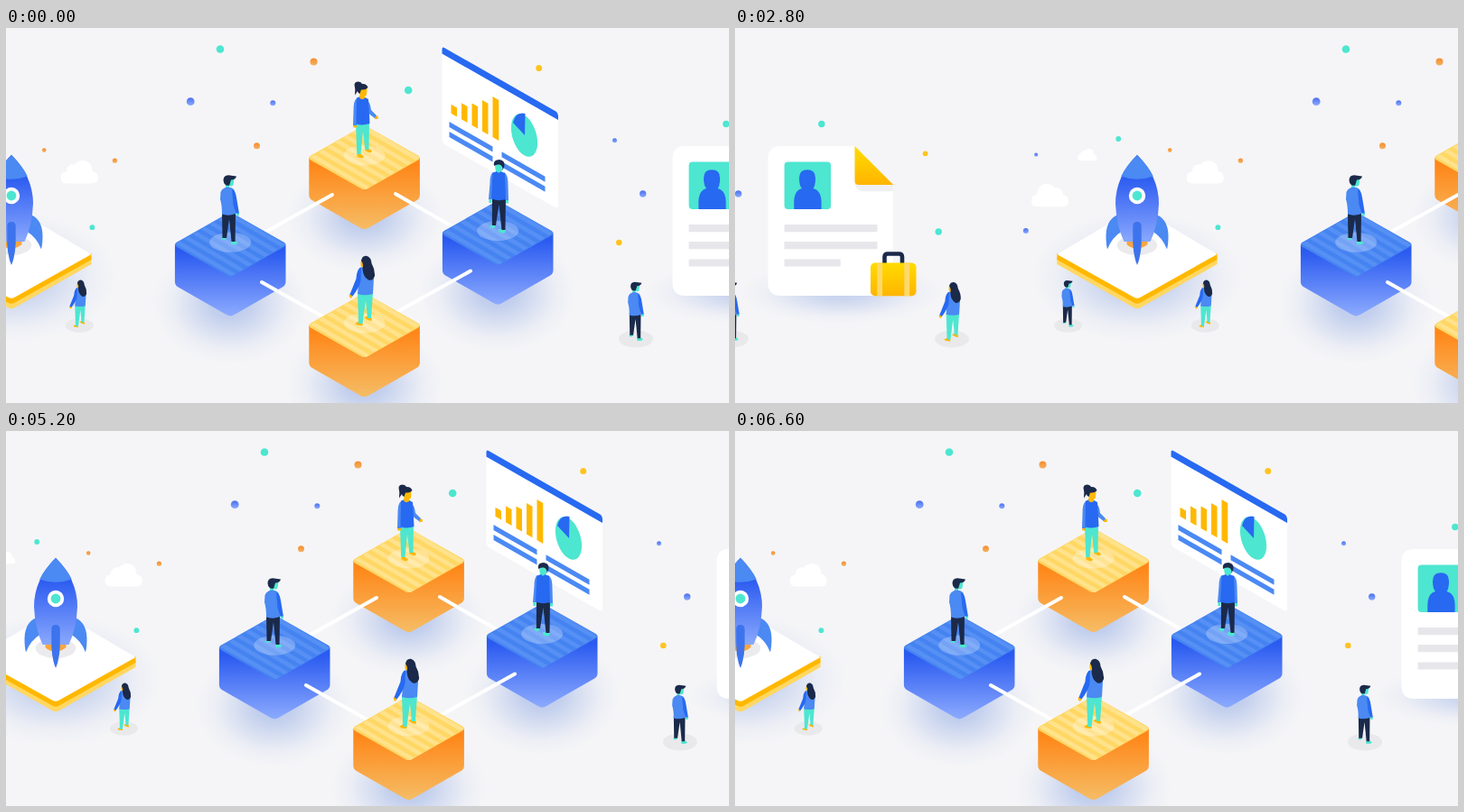
Recreate the animation shown at these times as an HTML page. Size 800 px wide and 416 px high, loop 7600 ms.

```html
<!DOCTYPE html>
<html lang="en">
<head>
<meta charset="utf-8">
<title>Sliding scenes</title>
<style>
html, body { margin: 0; width: 100%; height: 100%; overflow: hidden; background: #f5f5f7; }
#stage { position: relative; width: 100%; height: 100%; overflow: hidden; contain: strict; }
/* animating left keeps every step on whole pixels */
#strip { display: block; position: absolute; left: 0; top: 0; animation: slide 7600ms -4ms infinite; }
/* out and back in 19 equal steps of 100 ms each way */
@keyframes slide {
  0% { left: 0; }
  25% { left: 0; animation-timing-function: steps(19, end); }
  50% { left: -1480px; }
  61.842105% { left: -1480px; animation-timing-function: steps(19, end); }
  86.842105%, 100% { left: 0; }
}
.white { fill: #fff; }
.dark { fill: #1b2a4a; }
.teal { fill: #4de6d0; }
.yellow { fill: #ffb800; }
.blue { fill: #2769f1; }
.sky { fill: #4b89f3; }
.grey { fill: #e9e9ec; }
.link { stroke: #fff; stroke-width: 4; stroke-linecap: round; }
</style>
</head>
<body>
<div id="stage">
<svg id="strip" width="3420" height="416" viewBox="0 0 3420 416">
<defs>
  <linearGradient id="blueSide" gradientUnits="userSpaceOnUse" x1="0" y1="0" x2="0" y2="80">
    <stop offset=".1" stop-color="#2a5af0"/><stop offset="1" stop-color="#8dabfe"/>
  </linearGradient>
  <linearGradient id="orangeSide" gradientUnits="userSpaceOnUse" x1="0" y1="0" x2="0" y2="80">
    <stop offset=".1" stop-color="#ff8719"/><stop offset="1" stop-color="#f5bd66"/>
  </linearGradient>
  <linearGradient id="hull" gradientUnits="userSpaceOnUse" x1="0" y1="164" x2="0" y2="240">
    <stop offset="0" stop-color="#2a5af0"/><stop offset="1" stop-color="#8dabfe"/>
  </linearGradient>
  <linearGradient id="gold" x1="0" y1="0" x2="0" y2="1">
    <stop offset="0" stop-color="#ffdc00"/><stop offset="1" stop-color="#ffb400"/>
  </linearGradient>
  <linearGradient id="blueDot" x1="0" y1="0" x2="0" y2="1">
    <stop offset="0" stop-color="#4a70f0"/><stop offset="1" stop-color="#8dabfe"/>
  </linearGradient>
  <linearGradient id="orangeDot" x1="0" y1="0" x2="0" y2="1">
    <stop offset="0" stop-color="#f98c2c"/><stop offset="1" stop-color="#f2b264"/>
  </linearGradient>
  <radialGradient id="shade">
    <stop offset="0" stop-color="#a9bce8" stop-opacity=".8"/><stop offset=".25" stop-color="#a9bce8" stop-opacity=".66"/>
    <stop offset=".5" stop-color="#a9bce8" stop-opacity=".38"/><stop offset=".75" stop-color="#a9bce8" stop-opacity=".12"/>
    <stop offset="1" stop-color="#a9bce8" stop-opacity="0"/>
  </radialGradient>

  <path id="sides" d="M-61.3,0V41Q-61.3,45-58,47L-4,78Q0,80.3 4,78L58,47Q61.3,45 61.3,41V0Z"/>
  <path id="lid" d="M-59.5,-2.5L-4,-34Q0,-36.4 4,-34L59.5,-2.5Q63,0 59.5,2.5L4,34Q0,36.4-4,34L-59.5,2.5Q-63,0-59.5,-2.5Z"/>
  <clipPath id="lidClip"><use href="#lid"/></clipPath>
  <g id="stripes" clip-path="url(#lidClip)">
    <path transform="matrix(61.3 36 -61.3 36 0 -36)" fill="none" stroke-width=".075"
      d="M0,.04H1M0,.19H1M0,.34H1M0,.49H1M0,.64H1M0,.79H1M0,.94H1"/>
  </g>
  <g id="blueCube">
    <use href="#sides" fill="url(#blueSide)"/><use href="#lid" fill="#4583f1"/>
    <use href="#stripes" stroke="#5690f4"/>
    <ellipse cy="-2.5" rx="23" ry="11" fill="#fff" opacity=".25"/>
  </g>
  <g id="orangeCube">
    <use href="#sides" fill="url(#orangeSide)"/><use href="#lid" fill="#ffd764"/>
    <use href="#stripes" stroke="#ffe28b"/>
    <ellipse cy="-2.5" rx="23" ry="11" fill="#fff" opacity=".3"/>
  </g>

  <!-- figures stand on the origin -->
  <g id="man"><g transform="translate(-247.5 -238)">
    <path class="teal" d="M238.5,234L240,231H244L243.5,234Q241,236 238.5,234ZM249,236H253.5L257,238.5Q255,241 249,240Z"/>
    <path class="dark" d="M239,204H254L253.6,237H249.5L247,212L244,233H239.5Z"/>
    <path class="teal" d="M246,167H252.5L251.5,174Q250,176.5 247,175V179H243V172Z"/>
    <path class="dark" d="M240.5,169Q240.5,163.5 246,163.2L255,164.4Q254,168.3 249,168.5L247.2,174.5Q241.5,176 240.5,169Z"/>
    <path class="sky" d="M237.5,182Q240,176.5 246,176.5Q252,177 253,181L254,206Q246,209 239,206.5Q239,196 237,190Z"/>
    <path class="blue" d="M250,179Q254,180 255,188L258,206H254.5L251.5,196Z"/>
    <path class="teal" d="M254.5,205.5H258L257.5,208.5H255Z"/>
  </g></g>
  <g id="woman"><g transform="translate(-396.5 -327)">
    <path class="yellow" d="M386,328L390,325.5H394.5V330Q389,330.5 386,328ZM396.5,321L400,319.5L405,322L404.5,325Q399,324 396.5,321Z"/>
    <path class="teal" d="M389,293H406L404,322H400L398,302L394.5,328H390.2Z"/>
    <path class="yellow" d="M393,257Q391.5,264 394,266L398,267V256ZM380,295L384,296.5L382,300Q379,299 380,295Z"/>
    <path class="sky" d="M391,266Q398,264 404,268L407,278L406,295Q397,297.5 389,295L390,283Z"/>
    <path class="blue" d="M393,265.5Q388,267 387.5,278L380.5,295.5L383.5,297.5Q391,288 392.5,280Z"/>
    <path class="dark" d="M393,258Q394,252.6 399,252.8Q404,254 404.5,261Q408.5,268 408,275Q406,281 401,279.5Q395,276 394.5,267Q396,262 393,258Z"/>
  </g></g>
  <g id="ponytailWoman">
    <path class="yellow" d="M388,141L391,138.5L396,142.5L394.5,144.5Q389,144 388,141ZM397,135L400,133L405,136L404,138.3Q399,138 397,135Z"/>
    <path class="teal" d="M387,105H402L401.5,135H397.3L395,114L392.5,140H388.2Z"/>
    <path class="yellow" d="M392,67H399.5L399,74Q398,76 396.5,75.5V79H391ZM384,107H388V110.5H384.5ZM407.5,96.5L412,98L411.5,101H408Z"/>
    <path class="sky" d="M388,78Q384.5,80 384.5,92L384,108H388L390,90ZM399,80Q403,82 404,91L410,97L408,100L400,94Z"/>
    <path class="blue" d="M388,77.5Q395,74.5 401,79L402.5,106Q395,108.5 387.5,106.5Z"/>
    <path class="yellow" d="M391.5,75H397V78Q394,80 391.5,78Z"/>
    <path class="dark" d="M385.5,63Q386,59.5 390,59.6Q393,60 394,62Q399,61.5 400.5,66Q398,69 393,68.5L391.5,73Q389,72 389,70L386,74.5Q387,68 385.5,63Z"/>
  </g>
  <g id="frontMan">
    <path class="teal" d="M535,220L538,217.5H542L540.5,222Q537,223 535,220ZM545,223H553L552.5,227Q547,228.5 545,225.5ZM534.2,189H537.5V194H534.5ZM552.5,190H556V194.5H553Z"/>
    <path class="dark" d="M538,188H553L552.5,224H548.5L545.5,196L542,219H537.8Z"/>
    <path class="teal" d="M541,150H549.5V157Q548,160 547,160V163H543V160Q541,158 541,150Z"/>
    <path class="sky" d="M539,160Q535.5,162 535.5,172L534,190H537.5L541,172ZM551,160Q555.5,162 555.5,174L556,191H552.5L549,172Z"/>
    <path class="blue" d="M538.5,160.5L543,159Q545,162 547.5,159L552,161L553,190Q545,192.5 537,189.5Z"/>
    <path class="dark" d="M540,153Q538.5,146 546,146Q552,146.5 551.5,153L549.5,158Q550,152.5 546,151.5Q542,151 540,153Z"/>
  </g>
  <path id="cloud" class="white" d="M6.5,25.5Q0,25.5 0,19Q0,13 6,12.5Q7,3 15.5,4.5Q18,0 25.5,0Q34,1 35,12Q41,13 41,19Q41,25.5 34.5,25.5Z"/>
  <path id="fin" class="sky" d="M427,206Q411,210 410.5,230Q410.5,240 412,245.5Q417,232 429,225Z"/>

  <g id="cubes">
    <g fill="url(#shade)">
      <ellipse cx="248" cy="306" rx="86" ry="66"/><ellipse cx="544" cy="293" rx="86" ry="66"/>
      <ellipse cx="396.5" cy="209" rx="86" ry="62"/><ellipse cx="396.5" cy="395" rx="86" ry="66"/>
    </g>
    <g transform="matrix(1 .572 0 1 482.5 20.5)">
      <rect class="white" width="128.5" height="107" rx="4"/>
      <path class="blue" d="M0,8V3Q0,0 3,0H125.5Q128.5,0 128.5,3V8Z"/>
      <path class="yellow" d="M10,58.5h6.5v10H10ZM21.5,50.5H28v18H21.5ZM33,44h6.5v24.5H33ZM44.5,34H51v34.5H44.5ZM56,23.5h6.8v45H56Z"/>
      <path class="sky" d="M8,79h48v6H8ZM8,90h48v6H8ZM66,79h48v6H66ZM66,90h48v6H66Z"/>
      <ellipse class="teal" cx="91" cy="46.5" rx="14.6" ry="22.3"/>
    </g>
    <path class="blue" d="M574,119L574.5,95Q564,92.5 561,105Z"/>
    <use href="#orangeCube" x="396.6" y="143.9"/>
    <path class="link" d="M280,230.3L361,185M431,184L500,223.8"/>
    <use href="#blueCube" x="248.2" y="240.3"/>
    <use href="#blueCube" x="544.2" y="227.5"/>
    <path class="link" d="M283,282L360,325.5M425,319.2L514,269.5"/>
    <use href="#orangeCube" x="396.6" y="329.9"/>
    <use href="#ponytailWoman"/><use href="#frontMan"/>
    <use href="#man" x="247.5" y="238"/><use href="#woman" x="396.5" y="327"/>
    <g class="teal"><circle cx="237" cy="23.5" r="4.3"/><circle cx="445.2" cy="69" r="4.3"/></g>
    <g fill="url(#orangeDot)"><circle cx="340.5" cy="37.6" r="4"/><circle cx="277.5" cy="130.7" r="3.5"/></g>
    <g fill="url(#blueDot)"><circle cx="204.2" cy="81.7" r="4.4"/><circle cx="295.3" cy="83.2" r="3"/></g>
    <circle cx="589.7" cy="44.6" r="3.5" fill="#ffc422"/>
  </g>

  <g id="document">
    <ellipse cx="118" cy="294" rx="112" ry="34" fill="url(#shade)" opacity=".8"/>
    <path class="white" d="M50.5,131H132.5L175,174V297H50.5Q36.5,297 36.5,283V145Q36.5,131 50.5,131Z"/>
    <path fill="#f0f0f2" d="M132.5,170L175,174V181.2H142Q133,181 132.5,170Z"/>
    <path fill="url(#gold)" d="M132.5,131L175.3,174H137Q132.5,174 132.5,169.5Z"/>
    <rect class="teal" x="54.6" y="148.6" width="51.5" height="52.4" rx="4"/>
    <path class="blue" d="M65.3,201V194Q65.3,180 74,178Q71,175 71,166.5Q71,157.3 80,157.3Q89,157.3 89,166.5Q89,175 86.5,178Q95.6,180 95.6,194V201Z"/>
    <path fill="#e7e7eb" d="M54.6,218H157.5v8.2H54.6ZM54.6,237H157.5v8.2H54.6ZM54.6,256.4H116.7v8.2H54.6Z"/>
    <path d="M165.5,263V254Q165.5,250.5 169,250.5H181.5Q185,250.5 185,254V263" fill="none" stroke="#1b2a4a" stroke-width="4.6"/>
    <rect x="150" y="260.6" width="50.5" height="36.7" rx="5" fill="url(#gold)"/>
    <path fill="#ffd968" d="M157.3,260.6h5.8v36.7h-5.8ZM187.3,260.6h5.8v36.7h-5.8Z"/>
    <g class="grey"><ellipse cx="-4" cy="345" rx="19" ry="9.4"/><ellipse cx="240" cy="345" rx="19" ry="9.4"/></g>
    <use href="#man" transform="translate(-4 345) scale(.845)"/>
    <use href="#woman" transform="translate(240 345) scale(.85)"/>
    <g fill="url(#blueDot)"><circle cx="-27.5" cy="124.8" r="2.5"/><circle cx="3.7" cy="184" r="3.7"/></g>
    <g class="teal"><circle cx="95.8" cy="106.5" r="3.7"/><circle cx="225.2" cy="226" r="3.7"/></g>
    <g fill="#ffc422"><circle cx="-22.7" cy="238" r="3.3"/><circle cx="210.6" cy="139.3" r="2.9"/></g>
  </g>

  <g id="rocket">
    <ellipse cx="445" cy="276" rx="116" ry="72" fill="url(#shade)"/>
    <path fill="#ffd762" d="M356.3,255V262L441,310Q445,312.5 449,310L533.5,262V255Z"/>
    <path class="yellow" d="M356.3,250V257L441,304.5Q445,307 449,304.5L533.5,257V250Z"/>
    <path class="white" d="M356.3,251L441,201Q445,198.5 449,201L533.5,251L449,298.5Q445,301 441,298.5Z"/>
    <ellipse cx="445" cy="241" rx="22.3" ry="11" fill="#ebebed"/>
    <path fill="#f9a63f" d="M433.5,234H456.5V240Q451,245 445,244Q438,245 433.5,240Z"/>
    <use href="#fin"/><use href="#fin" transform="matrix(-1 0 0 1 890 0)"/>
    <path fill="url(#hull)" d="M445,140.8Q469,165 469,195Q468,219 459.5,237H430.5Q422,219 421,195Q421,165 445,140.8Z"/>
    <path class="sky" d="M445,140.8Q458,154 462.8,164.5Q445,171 427.2,164.5Q432,154 445,140.8Z"/>
    <circle class="white" cx="445" cy="186" r="9.2"/><circle class="teal" cx="445" cy="186" r="5.4"/>
    <path fill="#3d73ec" d="M440.3,220Q440.3,215 445,215Q449.7,215 449.7,220V239Q449,254 445,263Q441,254 440.3,239Z"/>
    <use href="#cloud" x="499.7" y="147"/>
    <use href="#cloud" transform="matrix(-1 0 0 1 369 172.7)"/>
    <use href="#cloud" transform="translate(379 134) scale(.52)"/>
    <g class="grey"><ellipse cx="368.5" cy="330" rx="15.5" ry="7.8"/><ellipse cx="520.3" cy="330" rx="15.5" ry="7.8"/></g>
    <use href="#man" transform="translate(368.5 330) scale(.67)"/>
    <use href="#woman" transform="translate(520.3 330) scale(.68)"/>
    <g fill="url(#blueDot)"><circle cx="333.2" cy="140.7" r="2.1"/><circle cx="321.8" cy="225" r="3"/></g>
    <g fill="url(#orangeDot)"><circle cx="481.2" cy="135.6" r="2.3"/><circle cx="559.4" cy="147.2" r="2.6"/></g>
    <g class="teal"><circle cx="424.2" cy="123" r="2.9"/><circle cx="534.4" cy="221.2" r="2.9"/></g>
  </g>

  <g id="tile">
    <use href="#rocket" x="-439"/><use href="#cubes"/><use href="#document" x="701"/>
  </g>
</defs>
<use href="#tile"/><use href="#tile" x="1140"/><use href="#tile" x="2280"/>
</svg>
</div>
</body>
</html>
```
